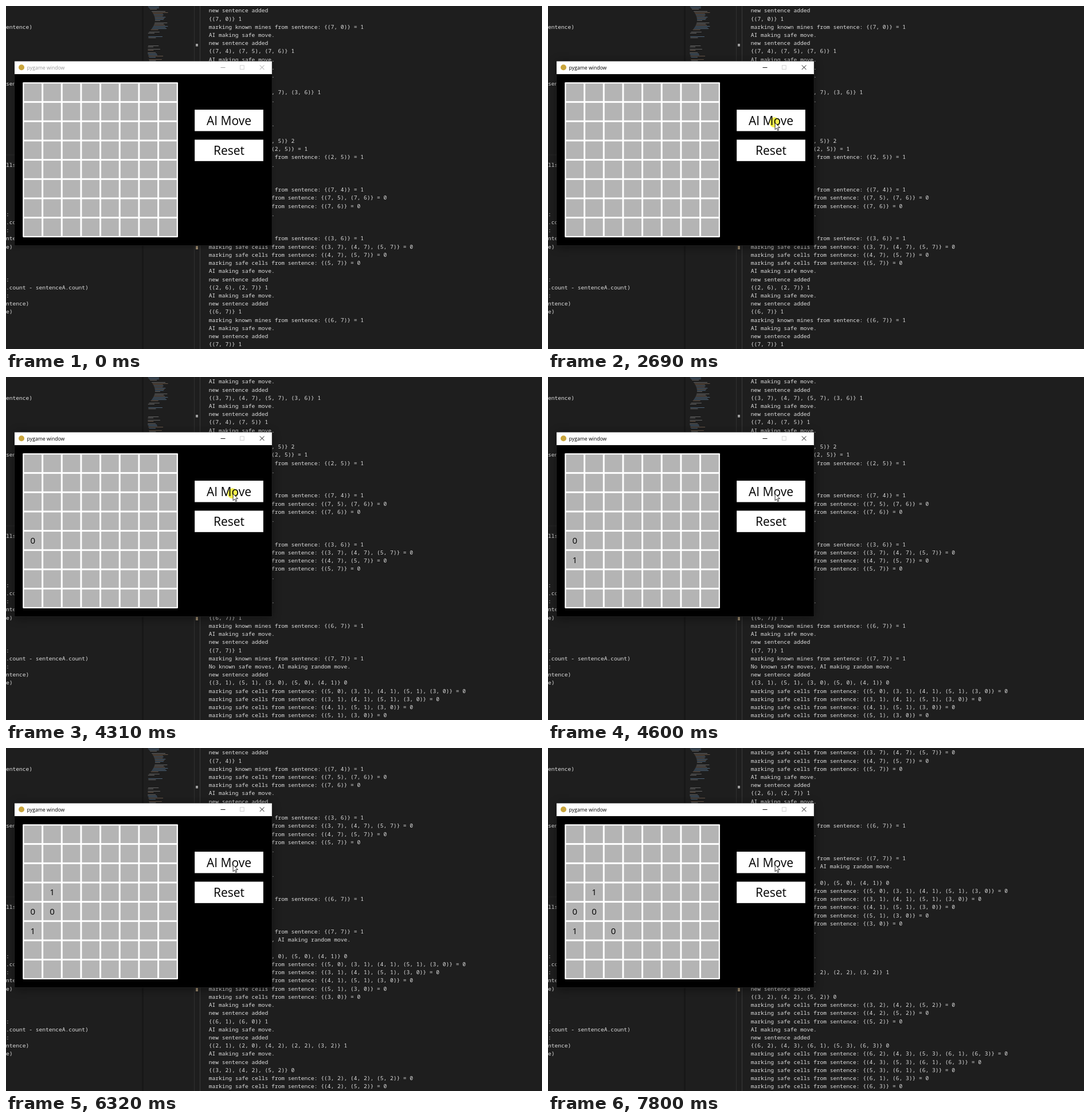
An HTML page with a canvas that plays this animation: 935x599 px, repeating every 8 s.

```html
<!DOCTYPE html>
<html lang="en">
<head>
<meta charset="utf-8">
<title>Minesweeper AI</title>
<style>
  html, body { margin: 0; width: 100%; height: 100%; overflow: hidden; background: #1e1e1e; }
  canvas { display: block; }
</style>
</head>
<body>
<canvas id="stage" width="935" height="599"></canvas>
<script>
const ctx = document.getElementById('stage').getContext('2d');
const LOOP = 8000, SCALE = 0.748, ROW = 14.22, ROWS = 42;
const MONO = '500 9.595px "Noto Sans Mono", monospace';
const SANS = '"Open Sans", sans-serif';

// Terminal log: each cell is written as two digits, row then column.
const cellSet = cells => `{${cells.split(' ').map(c => `(${c[0]}, ${c[1]})`).join(', ')}}`;
const SAFE_MOVE = 'AI making safe move.';
const added = (cells, count) => ['new sentence added', `${cellSet(cells)} ${count}`];
const move = (cells, count) => [SAFE_MOVE, ...added(cells, count)];
const mine = cell => `marking known mines from sentence: ${cellSet(cell)} = 1`;
// Each safe cell found is removed from the front of the sentence.
const safe = cells => cells.split(' ').map((_, i, all) =>
  `marking safe cells from sentence: ${cellSet(all.slice(i).join(' '))} = 0`);

const log = [
  ...added('70', 1), mine('70'),
  ...move('74 75 76', 1),
  SAFE_MOVE, SAFE_MOVE,
  ...move('37 47 57 36', 1),
  ...move('74 75', 1),
  ...move('25 05 15', 2), 'sentence inferred {(2, 5)} = 1', mine('25'),
  ...move('74', 1), mine('74'), ...safe('75 76'),
  ...move('36', 1), mine('36'), ...safe('37 47 57'),
  ...move('26 27', 1),
  ...move('67', 1), mine('67'),
  ...move('77', 1), mine('77'),
  'No known safe moves, AI making random move.',
  ...added('31 51 30 50 41', 0), ...safe('50 31 41 51 30'),
  ...move('61 60', 1),
  ...move('21 20 42 22 32', 1),
  ...move('32 42 52', 0), ...safe('32 42 52'),
  ...move('62 43 61 53 63', 0), ...safe('62 43 53 61 63')
];

const code = `
entence)






sentence)









lls





:
.count
:
ntence)
e)



:
.count - sentenceA.count)
:
ntence)
e)`.split('\n');
const CODE_ROW = 1;

// Timeline: first log line shown, mouse presses, opened cells
const scrolls = [[0, 0], [2970, 8], [4615, 12], [5060, 14], [6320, 20], [7800, 29]];
const clicks = [[2690, 2820], [4310, 4550], [6000, 6170], [7500, 7650]];
const reveals = [
  { at: 2820, row: 4, col: 0, count: 0 },
  { at: 4550, row: 5, col: 0, count: 1 },
  { at: 4680, row: 3, col: 1, count: 1 },
  { at: 6170, row: 4, col: 1, count: 0 },
  { at: 7650, row: 5, col: 2, count: 0 }
];

function rect(x, y, w, h, color) {
  ctx.fillStyle = color;
  ctx.fillRect(x, y, w, h);
}

function disc(x, y, r, color) {
  ctx.fillStyle = color;
  ctx.beginPath();
  ctx.arc(x, y, r, 0, 7);
  ctx.fill();
}

function text(str, x, y, font, color, align = 'left') {
  ctx.font = font;
  ctx.fillStyle = color;
  ctx.textAlign = align;
  ctx.fillText(str, x, y);
}

function line(color, x1, y1, x2, y2) {
  ctx.strokeStyle = color;
  ctx.lineWidth = 0.9;
  ctx.beginPath();
  ctx.moveTo(x1, y1);
  ctx.lineTo(x2, y2);
  ctx.stroke();
}

const baseline = row => 11.3 + row * ROW;

const noise = n => {
  const v = Math.sin(n * 12.9898) * 43758.5453;
  return v - Math.floor(v);
};

function drawMinimap() {
  const tints = ['#777', '#5a7690', '#7d6755'];
  for (let y = 1; y < 96; y += 2) {
    if (noise(y) < 0.25) continue;
    const nested = y < 48 ? 13 * Math.sin(y / 48 * Math.PI) : 3 * noise(y + 1);
    const width = 9 + 18 * noise(y + 2);
    rect(247 + nested, y, width, 0.8, tints[Math.floor(3 * noise(y + 3))]);
  }
}

function drawEditor() {
  rect(0, 0, 935, 599, '#1e1e1e');
  rect(0, 259.5, 238, 1, '#292929');
  rect(0, 272.5, 238, 1, '#292929');
  code.forEach((str, i) => text(str, 0, baseline(CODE_ROW + i), MONO, '#dedede'));
  rect(237, 0, 3, 599, '#181818');
  drawMinimap();
  rect(328, 0, 1, 599, '#303030');
  rect(338, 0, 1, 599, '#3a3a3a');
  rect(331, 66, 4, 4.5, '#a0a0a0');
  rect(331, 419, 4, 6, '#98866b');
}

function drawTerminal(t) {
  const first = scrolls.filter(([at]) => t >= at).pop()[1];
  for (let i = 0; i < ROWS; i++) text(log[first + i], 353.8, baseline(i), MONO, '#dedede');
}

function drawWindow(t) {
  const focus = t < 670 ? 0 : t < 750 ? 0.5 : 1;
  ctx.save();
  ctx.shadowColor = `rgba(0,0,0,${0.3 + 0.15 * focus})`;
  ctx.shadowBlur = 6 + 9 * focus;
  ctx.shadowOffsetY = 2;
  rect(14.6, 96.4, 449.6, 322.2, '#353535');
  ctx.restore();
  rect(15, 96.6, 448.8, 22.7, '#fff');
  rect(15, 119, 448.8, 299.2, '#000');

  disc(27, 107.3, 5, '#c9a53c');
  const ink = focus ? '#000' : '#999';
  text('pygame window', 36.6, 110.8, `8.7px ${SANS}`, ink);
  line(ink, 374.5, 107.5, 382.5, 107.5);
  line(ink, 442.8, 103.4, 450.4, 111);
  line(ink, 450.4, 103.4, 442.8, 111);
  ctx.strokeStyle = '#ccc';
  ctx.strokeRect(408.4, 103.8, 6.8, 6.8);
  drawGame(t);
}

// Drawn in the game's own 600 by 400 units.
function drawGame(t) {
  ctx.save();
  ctx.translate(15, 119);
  ctx.scale(SCALE, SCALE);
  ctx.fillStyle = '#fff';
  ctx.beginPath();
  ctx.roundRect(19, 19, 362, 362, 1.5);
  ctx.fill();
  for (let row = 0; row < 8; row++) {
    for (let col = 0; col < 8; col++) rect(22 + col * 45, 22 + row * 45, 41, 41, '#b4b4b4');
  }
  for (const { at, row, col, count } of reveals) {
    if (t >= at) text(count, 42.5 + col * 45, 50 + row * 45, `20px ${SANS}`, '#000', 'center');
  }
  ['AI Move', 'Reset'].forEach((label, i) => {
    const y = 83 + 70 * i;
    rect(420, y, 160, 50, '#fff');
    text(label, 500, y + 35.5, `28px ${SANS}`, '#000', 'center');
  });
  ctx.restore();
}

function drawPointer(t) {
  if (t < 70) return;
  if (clicks.some(([down, up]) => t >= down && t < up)) {
    ctx.globalCompositeOperation = 'multiply';
    disc(395.3, 203.3, 9, '#f4f04c');
    ctx.globalCompositeOperation = 'source-over';
  }
  const p = Math.min(6, Math.floor((t - 70) / 75)) / 6;
  const eased = p * p * (3 - 2 * p);
  ctx.save();
  ctx.translate(829 - 433.3 * eased, 533 - 329.5 * eased);
  ctx.scale(SCALE, SCALE);
  const arrow = new Path2D('M.5 .5V16.5L4.2 13L6.7 18.6L9.2 17.5L6.8 12H11.8Z');
  ctx.fillStyle = '#fff';
  ctx.fill(arrow);
  ctx.strokeStyle = '#000';
  ctx.lineWidth = 1.1;
  ctx.stroke(arrow);
  ctx.restore();
}

function frame() {
  const t = performance.now() % LOOP;
  drawEditor();
  drawTerminal(t);
  drawWindow(t);
  drawPointer(t);
  requestAnimationFrame(frame);
}
frame();
</script>
</body>
</html>
```
